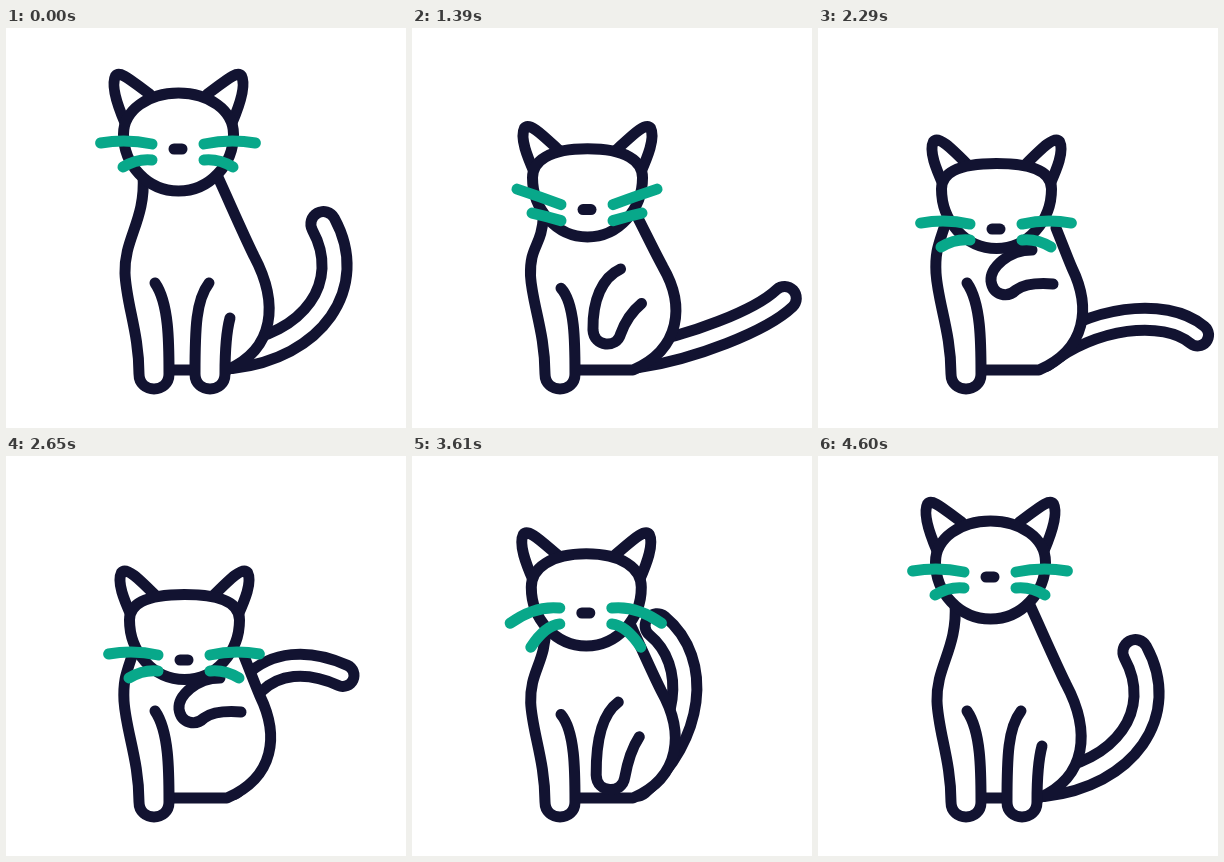
Animation of 400x400 px, one loop 4630 ms. Source, as an HTML page with a canvas:

```html
<!DOCTYPE html>
<html lang="en">
<head>
<meta charset="utf-8">
<title>Cat</title>
<style>
  html, body { margin: 0; width: 100%; height: 100%; overflow: hidden; background: #fff; }
  canvas { display: block; width: 400px; height: 400px; }
</style>
</head>
<body>
<canvas id="stage" width="400" height="400"></canvas>
<script>
const LOOP = 4630, LINE = 11;
const NAVY = '#121331', GREEN = '#08a88a', WHITE = '#fff';
const ctx = document.getElementById('stage').getContext('2d');
ctx.lineCap = ctx.lineJoin = 'round';

const mix = (a, b, k) => a + (b - a) * k;

// Smooth 0 to 1 between two times
function ease(t, from, to) {
  const u = Math.min(1, Math.max(0, (t - from) / (to - from)));
  return u * u * (3 - 2 * u);
}

// Rises from a to b, falls from c to d
const pulse = (t, a, b, c, d) => ease(t, a, b) * (1 - ease(t, c, d));

const headCurl = t => pulse(t, 1030, 1560, 3300, 3900);
const curlRate = t => (headCurl(t + 5) - headCurl(t - 5)) / 10;

function poseAt(t) {
  const curl = headCurl(t);
  const fold = pulse(t, 1030, 1750, 3280, 3800);
  const lick = pulse(t, 1900, 2260, 2260, 2650);
  const crouch = pulse(t, 2700, 3280, 3280, 3600);
  const hop = pulse(t, 3500, 3940, 3940, 4550);
  const top = 65 + 73.5 * curl + 14 * crouch - 3 * lick - 12 * hop;
  return {
    curl, fold, hop, top,
    x: 172.5 + 6 * fold,
    height: 98 - 13 * curl - 6 * crouch + 2 * hop,
    noseY: top + 56 + 9.5 * fold - 4 * crouch + 2 * hop,
    // Whiskers drag behind the head, then swing through
    droop: -6 + 6500 * (curlRate(t - 350) - curlRate(t)),
    dip: 7 * crouch + 20 * (curl - fold)
  };
}

function draw(d, color = NAVY, width = LINE, fill) {
  const path = new Path2D(d);
  if (fill) { ctx.fillStyle = fill; ctx.fill(path); }
  ctx.strokeStyle = color;
  ctx.lineWidth = width;
  ctx.stroke(path);
}

// The tip swings around the root while the spine bows to one side
function drawTail(t, { fold }) {
  const drop = ease(t, 1030, 1650), back = ease(t, 3280, 4250);
  const angle = (-55 + 54 * drop - 92 * ease(t, 2100, 3250) + 38 * back) * Math.PI / 180;
  const bend = 62 - 80 * drop - 57 * ease(t, 2120, 2650) + 118 * ease(t, 2650, 3280) + 19 * back;
  const length = 161 - 5 * fold, width = 25 - 3 * fold;
  const cos = Math.cos(angle), sin = Math.sin(angle);
  const point = (along, side) =>
    `${225 + along * length * cos - side * sin} ${328 + along * length * sin + side * cos} `;
  const spine = `M${point(0, 0)}C${point(.34, bend)}${point(.81, bend)}${point(1, 0)}`;
  draw(spine, NAVY, width + LINE);
  draw(spine, WHITE, width - LINE);
}

function drawBody({ curl, fold, hop, dip }) {
  const sx = 211 + 27 * fold, sy = 147 + 53 * curl - 12 * hop;
  const mx = 248 + 6 * fold - 3 * hop, my = 228 + 12 * fold + dip;
  draw(`M${sx} ${sy}C${mix(sx, mx, .38)} ${mix(sy, my, .38)} ${mix(sx, mx, .7)} ${mix(sy, my, .72)} ${mx} ${my}
    C${273 - 3 * hop} ${275 + 4 * fold} 269 321 221 342L148 342`, NAVY, LINE, WHITE);
  draw(`M${137 - 11 * fold} ${sy}C${140 - 20 * fold} ${sy + 45 - 27 * fold} ${118 - fold} ${210 + 15 * fold}
    ${119 - fold} ${245 + dip / 2}C120 275 133 305 133 346C133 366 163 366 163 346
    C163 315 163 275 149 ${255 + dip}`, NAVY, LINE, WHITE);
}

const pawDown = [203, 255, 190, 272, 189, 300, 189, 346, 189, 366, 219, 366, 219, 346, 219, 325, 220, 305, 224, 290];
const pawUp = [214, 222, 190, 222, 172, 240, 173, 253, 175, 268, 190, 270, 198, 262, 208, 255, 222, 255, 235, 256];

function drawPaw({ fold, dip }) {
  const [x, y, ...curve] = pawDown.map((v, i) => mix(v, pawUp[i] + (i % 2 && dip), fold));
  draw(`M${x} ${y}C${curve}`, NAVY, LINE, WHITE);
}

function drawHead({ x, top, height, curl }) {
  const w = 55, side = height * mix(.42, .3, curl), crown = w * mix(.55, .75, curl);
  const low = mix(side, height, .53), base = mix(31, 22, curl), tip = mix(-17, -22, curl);
  ctx.save();
  ctx.translate(x, top);
  for (const s of [-1, 1]) {
    draw(`M${s * 53} ${base}C${s * 60} ${base - 16} ${s * 68} ${tip + 10} ${s * 63} ${tip}
      C${s * 58} ${tip - 6} ${s * 46} ${tip + 6} ${s * 29} 1`, NAVY, LINE, WHITE);
  }
  draw(`M0 0C${crown} 0 ${w} ${side * .42} ${w} ${side}C${w} ${low} ${w * .57} ${height} 0 ${height}
    C${-w * .57} ${height} ${-w} ${low} ${-w} ${side}C${-w} ${side * .42} ${-crown} 0 0 0Z`, NAVY, LINE, WHITE);
  ctx.restore();
}

function drawFace({ x, noseY, droop, fold }) {
  const bow = (droop + 22) * .32;
  const whisker = (s, y0, x1, y1) =>
    draw(`M${s * 26} ${y0}Q${s * (26 + x1) / 2} ${(y0 + y1) / 2 - bow} ${s * x1} ${y1}`, GREEN);
  ctx.save();
  ctx.translate(x - .5, noseY);
  draw('M-4 0H4');
  for (const s of [-1, 1]) {
    whisker(s, -5, 78 - 2 * fold - droop * droop / 60, droop);
    whisker(s, 11, 55, droop + 24);
  }
  ctx.restore();
}

function frame(now) {
  const t = now % LOOP, pose = poseAt(t);
  ctx.fillStyle = WHITE;
  ctx.fillRect(0, 0, 400, 400);
  drawTail(t, pose);
  drawBody(pose);
  drawPaw(pose);
  drawHead(pose);
  drawFace(pose);
  requestAnimationFrame(frame);
}
requestAnimationFrame(frame);
</script>
</body>
</html>
```
